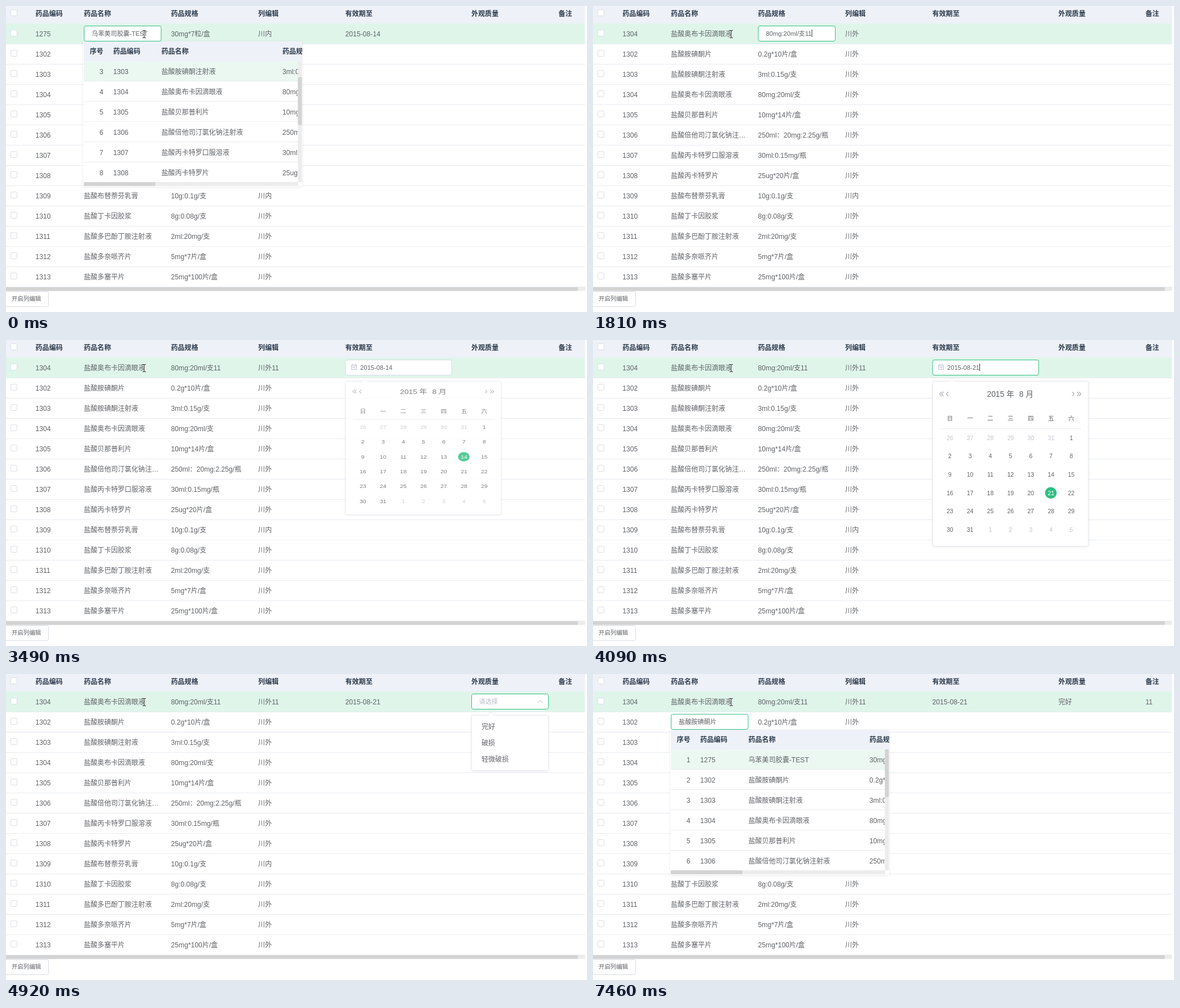
An HTML page that plays this animation: 1030x544 px, repeating every 8 s.

```html
<!DOCTYPE html>
<html lang="zh">
<head>
<meta charset="utf-8">
<style>
  html, body { margin: 0; width: 100%; height: 100%; overflow: hidden; background: #fff; }
  svg { display: block; font-family: "Liberation Sans", "Noto Sans CJK SC", "Noto Sans CJK", sans-serif; }
  .pop { filter: drop-shadow(0 1px 2px rgba(0, 0, 0, .09)); }
</style>
</head>
<body>
<svg id="stage" width="1030" height="544" viewBox="0 0 1030 544"></svg>
<script>
const LOOP = 8000, WIDTH = 1026.5;
const INK = '#606266', HEAD = '#2c3a4c', PALE = '#b8bec9', LINE = '#e8ebf1',
      EDGE = '#d8dce5', GREEN = '#2fbf80', MIX = '#84ceb3', HEAD_BG = '#eef1f7';
const COLS = [52.3, 138, 292.5, 447.1, 601.5, 825, 979.5];
const TITLES = ['药品编码', '药品名称', '药品规格', '列编辑', '有效期至', '外观质量', '备注'];
const DRUGS = [
  [1275, '乌苯美司胶囊-TEST', '30mg*7粒/盒', '川内', '2015-08-14'],
  [1302, '盐酸胺碘酮片', '0.2g*10片/盒', '川外'],
  [1303, '盐酸胺碘酮注射液', '3ml:0.15g/支', '川外'],
  [1304, '盐酸奥布卡因滴眼液', '80mg:20ml/支', '川外'],
  [1305, '盐酸贝那普利片', '10mg*14片/盒', '川外'],
  [1306, '盐酸倍他司汀氯化钠注射液', '250ml：20mg:2.25g/瓶', '川外'],
  [1307, '盐酸丙卡特罗口服溶液', '30ml:0.15mg/瓶', '川外'],
  [1308, '盐酸丙卡特罗片', '25ug*20片/盒', '川外'],
  [1309, '盐酸布替萘芬乳膏', '10g:0.1g/支', '川内'],
  [1310, '盐酸丁卡因胶浆', '8g:0.08g/支', '川外'],
  [1311, '盐酸多巴酚丁胺注射液', '2ml:20mg/支', '川外'],
  [1312, '盐酸多奈哌齐片', '5mg*7片/盒', '川外'],
  [1313, '盐酸多塞平片', '25mg*100片/盒', '川外']
];

const rect = (x, y, w, h, fill, more = '') =>
  `<rect x="${x}" y="${y}" width="${w}" height="${h}" fill="${fill}" ${more}/>`;
const path = (d, stroke, more = '') => `<path d="${d}" fill="none" stroke="${stroke}" ${more}/>`;
const box = (x, y, w, h, stroke, r = 3) =>
  rect(x + .5, y + .5, w - 1, h - 1, '#fff', `stroke="${stroke}" rx="${r}"`);

// Text whose middle lies at height y
function text(s, x, y, size = 12.05, fill = INK, more = '') {
  return `<text x="${x}" y="${Math.round(y + size * .385)}" font-size="${size}" fill="${fill}" ${more}>${s}</text>`;
}
// Table text: Latin letters run slightly wider
function cell(s, x, y, fill, more) {
  const wide = String(s).replace(/[ -~]+/g, '<tspan font-size="12.17">$&</tspan>');
  return text(wide, x, y, 12.05, fill, more);
}
const title = (s, x, y) => cell(s, x, y, HEAD, 'font-weight="bold"');
const middle = (s, x, y, size, fill) => text(s, x, y, size, fill, 'text-anchor="middle"');

function input(x, y, w, value, stroke, caretX, pad = 14, fill = INK) {
  return box(x, y, w, 28, stroke) + text(value, x + pad, y + 13.5, 11.17, fill) +
    (caretX ? rect(caretX, y + 7, 1, 13, '#333') : '');
}

function table(rows) {
  let s = rect(0, 0, WIDTH, 31, HEAD_BG) + rect(0, 31, WIDTH, 36, '#dff5ea');
  TITLES.forEach((name, i) => s += title(name, COLS[i], 13));
  for (let r = -1; r < rows.length; r++) s += box(8, 42 + 36 * r, 12, 12, EDGE, 2);
  rows.forEach((row, r) => {
    s += rect(0, 67 + 36 * r, WIDTH, 1, LINE);
    row.forEach((v, c) => {
      const shown = c === 1 && v.length > 11 ? v.slice(0, 10) + '…' : v;
      s += cell(shown, COLS[c], 49 + 36 * r);
    });
  });
  return s + rect(0, 500, WIDTH, 6.5, '#ececec') + rect(-3, 500, 1017, 6.5, '#d3d3d3', 'rx="2"') +
    box(-3, 507, 79, 28, EDGE) + text('开启列编辑', 10, 520, 10.4);
}

// Drug list under a name field
function drugList(y, first, active) {
  let s = `<g class="pop">${rect(137, y, 388, 258, '#fff', 'rx="2"')}</g>` +
    rect(138, y, 387, 35, HEAD_BG) + '<svg width="525" height="544">' +
    title('序号', 148.5, y + 17) + title('药品编码', 190, y + 17) +
    title('药品名称', 275.5, y + 17) + title('药品规格', 490, y + 17) + '</svg>';
  s += '<svg width="518" height="544">';
  for (let k = 0; k < 6; k++) {
    const i = first + k, top = y + 35 + 36 * k, mid = top + 18, d = DRUGS[i];
    if (i === active) s += rect(138, top, 380, 36, '#ebf8f2');
    s += rect(138, top + 35, 380, 1, LINE) +
      cell(i + 1, 172.5, mid, INK, 'text-anchor="end"') +
      cell(d[0], 190, mid) + cell(d[1], 275.5, mid) + cell(d[2], 490, mid);
  }
  return s + '</svg>' + rect(517.5, y + 35, 7, 216, '#ececec') +
    rect(517.5, y + 35 + 14.2 * first, 7, 85, '#d3d3d3', 'rx="2"') +
    rect(138, y + 250, 380, 7, '#ececec') + rect(138, y + 250, 127, 7, '#d3d3d3', 'rx="2"') +
    rect(518, y + 250, 7, 7, '#fff');
}

// Floating panel with a notch, unfolding from its top edge
function panel(x, w, h, open, inner) {
  const n = x + 35;
  return `<g class="pop" opacity="${open}" transform="translate(0 73) scale(1 ${open}) translate(0 -73)">` +
    box(x, 73, w, h, '#e6e9ef') +
    `<path d="M${n - 5.5} 74L${n} 68.5L${n + 5.5} 74" fill="#fff" stroke="#eef0f4"/>` + inner + '</g>';
}

function calendar(open, picked) {
  const chevron = (x, d) => path(`M${x} 92l${d} 4l${-d} 4`, '#7d828c');
  let s = chevron(618, -3.5) + chevron(621.5, -3.5) + chevron(630, -3.5) +
    chevron(849.5, 3.5) + chevron(858, 3.5) + chevron(861.5, 3.5) +
    text('2015 年', 698.5, 95.5, 13.75) + text('8 月', 755.5, 95.5, 13.75) +
    rect(616, 157, 250, 1, LINE);
  for (let i = 0; i < 49; i++) {
    const x = 632.7 + 35.85 * (i % 7);
    if (i < 7) { s += middle('日一二三四五六'[i], x, 139, 10.6, INK); continue; }
    const n = i - 12, y = 174 + 32.6 * (Math.floor(i / 7) - 1);
    const inside = n > 0 && n < 32;
    if (n === picked) s += `<circle cx="${x - .3}" cy="${y}" r="10.3" fill="${GREEN}"/>`;
    s += middle(n < 1 ? n + 31 : n > 31 ? n - 31 : n, x, y - .3, 10.4,
      n === picked ? '#fff' : inside ? INK : '#c0c4cc');
  }
  return panel(601.5, 277, 294, open, s);
}

const options = open => panel(825, 137, 99, open,
  ['完好', '破损', '轻微破损'].map((s, i) => text(s, 843, 93.5 + 29 * i)).join(''));

const calendarIcon = path('M612.5 44.5h9v8h-9zM612.5 47h9M614.5 43v2M619.5 43v2M614 49.5h6', PALE, 'stroke-width=".9"');

function draw(t) {
  const on = (a, b) => t >= a && t < b;
  const typed = (a, b) => '1'.repeat((t >= a) + (t >= b));
  const rows = DRUGS.slice();
  if (t >= 580) {
    rows[0] = [1304, DRUGS[3][1], DRUGS[3][2] + (t >= 2240 ? '11' : ''), '川外' + (t >= 3490 ? '11' : ''),
      t >= 4650 ? '2015-08-21' : '', t >= 5510 ? '完好' : '', t >= 6760 ? '11' : ''];
  }
  let s = table(rows);

  if (t < 580) {
    s += drugList(63, 2, t < 150 ? 2 : 3) + input(138, 35, 137.5, DRUGS[0][1], GREEN, t >= 150 && 250);
  } else if (t < 2240) {
    const add = typed(1690, 1810);
    s += input(292.5, 35, 137.5, DRUGS[3][2] + add, t < 860 ? EDGE : t < 1010 ? MIX : GREEN,
      (on(860, 1380) || t >= 1690) && 376 + 5.8 * add.length);
  } else if (t < 3490) {
    const add = typed(2910, 3030);
    s += input(447, 35, 137.5, '川外' + add, t < 2640 ? EDGE : GREEN, t >= 2490 && 483 + 5.8 * add.length);
  } else if (t < 4650) {
    const day = t < 4090 ? 14 : 21;
    s += input(601.5, 35, 189, '2015-08-' + day, t < 3640 ? EDGE : GREEN,
      (on(3640, 3940) || t >= 4090) && 685, 26.5) + calendarIcon +
      calendar(t < 3640 ? .81 : t < 3790 ? .997 : 1, day);
  } else if (t < 5510) {
    const chevron = t < 4800 ? 'M942.5 47l4.7 4.5l4.7-4.5' : 'M942.5 51.5l4.7-4.5l4.7 4.5';
    s += input(825, 35, 137, '请选择', t < 4800 ? EDGE : GREEN, 0, 13.5, PALE) + path(chevron, PALE) +
      (t < 4800 ? calendar(.5, 21) : options(t < 4920 ? .81 : 1));
  } else if (t < 6760) {
    const add = typed(6050, 6170);
    s += `<svg width="${WIDTH}" height="544">` + input(979.5, 35, 137.5, add,
      t < 5810 ? EDGE : t < 5930 ? MIX : GREEN, t >= 5810 && 993 + 5.8 * add.length) + '</svg>';
  } else {
    s += drugList(99, 0, 0) + input(138, 71, 137.5, DRUGS[1][1], t < 7030 ? EDGE : GREEN, on(7030, 7460) && 219);
  }

  // Mouse pointer
  const beam = 'M242 43.5h2.5l.5 1l.5-1h2.5M245 44.5v11M242 56.5h2.5l.5-1l.5 1h2.5';
  return s + path(beam, '#fff', 'stroke-width="2.4" opacity=".6"') + path(beam, '#222');
}

const stage = document.getElementById('stage');
const start = performance.now();
let last = '';
function frame(now) {
  const html = draw(Math.max(0, now - start) % LOOP);
  if (html !== last) stage.innerHTML = last = html;
  requestAnimationFrame(frame);
}
frame(start);
</script>
</body>
</html>
```
